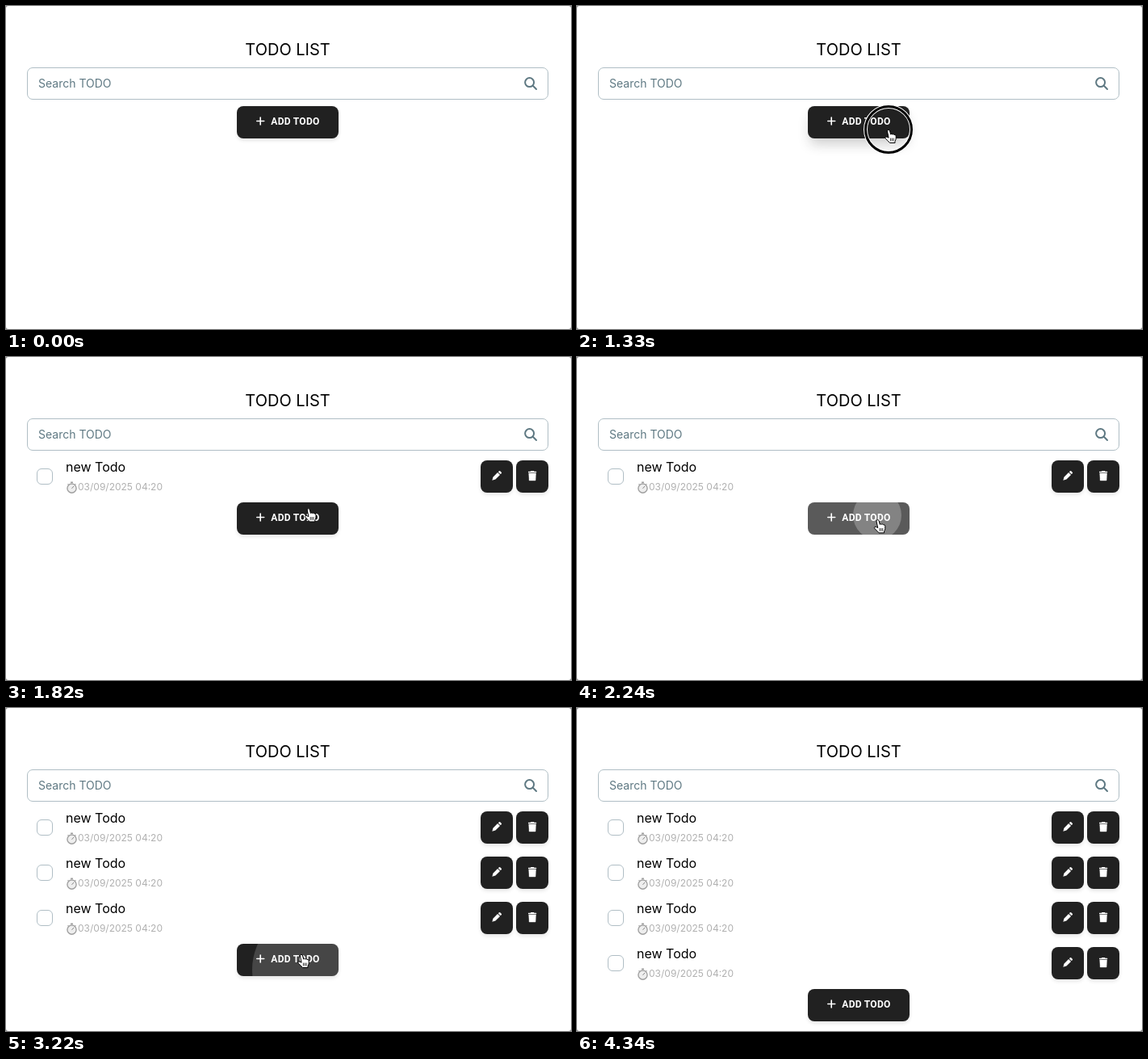
Animation, 700 px wide and 400 px high, one loop 4760 ms. Source, as an HTML page:

```html
<!DOCTYPE html>
<html lang="en">
<head>
<meta charset="utf-8">
<title>Todo list</title>
<style>
  html, body { margin: 0; width: 100%; height: 100%; overflow: hidden; background: #8a8a8a; }
  #stage { position: relative; width: 700px; height: 400px; overflow: hidden; background: #fff;
    border-radius: 3px; font-family: Inter, sans-serif; color: #000; }
  #stage div, #stage svg, #stage span { position: absolute; box-sizing: border-box; white-space: nowrap; }
  svg { overflow: visible; }
  .title { left: 0; width: 698px; top: 40px; text-align: center; font-size: 20px; line-height: 28px; }
  .search { left: 26px; top: 76px; width: 646px; height: 40px; border: 1px solid #b0bec5;
    border-radius: 7px; color: #5f7983; font-size: 14px; line-height: 38px; padding-left: 13px; }
  .dark { background: #212121; border-radius: 8px; height: 40px; box-shadow: 0 3px 5px -1px rgba(33,33,33,.14); }
  .row { left: 0; width: 700px; height: 56px; }
  .check { left: 38px; top: 22px; width: 20px; height: 20px; border: 1px solid #b0bec5; border-radius: 6px; }
  .name { left: 74px; top: 8px; font-size: 16px; line-height: 24px; }
  .date { left: 89px; top: 37px; font-size: 12px; line-height: 16px; color: #b0b0b0; }
  .tool { top: 12px; width: 40px; }
  #add { left: 286px; width: 126px; overflow: hidden; }
  #add span { left: 42.3px; top: 10px; color: #fff; font: 700 12px/18px Roboto, sans-serif; letter-spacing: .024em; }
  #ripple { border-radius: 50%; background: #fff; }
</style>
</head>
<body>
<div id="stage">
  <div class="title">TODO LIST</div>
  <div class="search">Search TODO</div>
  <svg style="left:642px;top:88px" width="16" height="16" fill="none" stroke="#5f7983" stroke-width="2" stroke-linecap="round">
    <circle cx="6.6" cy="6.6" r="5.5"/><path d="M10.8 10.8 15 15"/>
  </svg>
  <div id="rows"></div>
  <div id="add" class="dark">
    <svg style="left:24px;top:13px" width="11" height="11" stroke="#fff" stroke-width="1.6" stroke-linecap="round">
      <path d="M5.2 1V10M.8 5.5H9.7"/>
    </svg>
    <span>ADD TODO</span>
    <div id="ripple"></div>
  </div>
  <svg style="left:0;top:0" width="700" height="400">
    <g id="ring" fill="none">
      <circle r="28.5" stroke="#fff" stroke-width="5"/>
      <circle r="28.5" stroke="#000" stroke-width="3"/>
    </g>
    <g id="hand" stroke="#000" stroke-linejoin="round" stroke-linecap="round">
      <path fill="#fff" d="M-1.5 1.2Q0-.8 1.4 1L2.6 6Q3.6 4.8 4.8 6Q6 5 7 6.4Q8.8 5.8 9.2 8V11Q9 13 8 14.5V16.5H1.5Q-.5 14-3.5 11.5Q-5 9.8-3.6 9Q-2.4 8.6-.2 10Z"/>
      <path stroke-width=".8" d="M2.4 11V14M4.3 11V14M6.2 11V14"/>
    </g>
    <path id="arrow" stroke="#fff" d="M0 0V14L3.2 11 5.4 16 7.8 15 5.7 10.2H10Z"/>
  </svg>
</div>
<script>
const LOOP = 4760, STEP = 70, ROW = 56, TOP = 116;
const LEFT = 286, WIDTH = 126, HEIGHT = 40;
// ms after a click: ring gone, button pressed, row added, ripple faded
const RING = 140, PRESS = 65, ADD = 180, FADE = 420;

// each click, and the moment before it when the button lifts
const clicks = [
  { lift: 980, at: 1330 }, { lift: 1890, at: 2100 },
  { lift: 2520, at: 2968 }, { lift: 3360, at: 3705 }
];
// pointer moves: from, until, to x, to y
const moves = [
  [70, 560, 405, 148], [560, 700, 386, 153], [1470, 1960, 372, 196], [2170, 2590, 380, 268],
  [3010, 3220, 366, 305], [3220, 3500, 355, 318], [3920, 4340, 352, 410]
];

const rowHtml = `
  <div class="check"></div>
  <div class="name">new Todo</div>
  <svg style="left:74px;top:38px" width="15" height="16" fill="none" stroke="#a0a0a0">
    <circle cx="7.5" cy="8.6" r="5.6" fill="#eee" stroke-width="1.4"/>
    <path d="M6 1.2H9M2.6 3.2 3.4 4M12.4 3.2 11.6 4" stroke-width="1.4"/>
    <path d="M7.5 8.8 10 6" stroke="#888"/>
  </svg>
  <div class="date">03/09/2025 04:20</div>
  <div class="dark tool" style="left:588px">
    <svg style="left:14px;top:12.5px" width="12" height="12" fill="#fff">
      <g transform="translate(6 6) rotate(45)">
        <rect x="-2.1" y="-7" width="4.2" height="2.5" rx="1"/>
        <path d="M-2.1-3.6H2.1V4.4L0 8-2.1 4.4Z"/>
      </g>
    </svg>
  </div>
  <div class="dark tool" style="left:632px">
    <svg style="left:15px;top:12.5px" width="10" height="12" fill="#fff">
      <rect x="3" width="4.2" height="2" rx=".6"/>
      <rect y=".8" width="10.2" height="1.5" rx=".5"/>
      <path d="M.7 3H9.5L9 12H1.2Z" stroke="#fff" stroke-width=".4" stroke-linejoin="round"/>
    </svg>
  </div>`;

const $ = id => document.getElementById(id);
const show = (el, on) => el.style.display = on ? '' : 'none';
const place = (el, [x, y]) => el.setAttribute('transform', `translate(${x} ${y})`);
const ease = k => k * k * (3 - 2 * k);
const clamp = k => Math.max(0, Math.min(1, k));

const rows = clicks.map((_, i) => {
  const row = document.createElement('div');
  row.className = 'row';
  row.style.top = TOP + i * ROW + 'px';
  row.innerHTML = rowHtml;
  $('rows').append(row);
  return row;
});

function pointerAt(t) {
  let x = 362, y = 400;
  for (const [from, until, toX, toY] of moves) {
    const k = ease(clamp((t - from) / (until - from)));
    x += (toX - x) * k;
    y += (toY - y) * k;
  }
  return [x, y];
}

const buttonTop = count => TOP + 8 + count * ROW;

function drawButton(t, top) {
  const style = $('add').style;
  const lifted = clicks.find(c => t >= c.lift && t < c.at + PRESS);
  const pressed = clicks.some(c => t >= c.at + PRESS && t < c.at + ADD);
  const k = lifted ? clamp((t - lifted.lift + STEP) / (2 * STEP)) : 0;
  style.top = top + 'px';
  style.background = pressed ? '#5a5a5a' : '';
  style.boxShadow = pressed ? 'none'
    : `0 ${3 + 7 * k}px ${5 + 10 * k}px ${-1 - 2 * k}px rgba(33,33,33,${.14 + .08 * k})`;
}

function drawRipple(t) {
  const n = clicks.findIndex(c => t >= c.at + PRESS && t < c.at + PRESS + FADE);
  show($('ripple'), n >= 0);
  if (n < 0) return;
  const [x, y] = pointerAt(clicks[n].at);
  const age = t - clicks[n].at - PRESS, r = age * .4;
  Object.assign($('ripple').style, {
    left: x - LEFT - r + 'px',
    top: y - buttonTop(n) - r + 'px',
    width: 2 * r + 'px',
    height: 2 * r + 'px',
    opacity: .3 * (1 - age / FADE)
  });
}

function drawPointer(t, top) {
  const tip = pointerAt(t);
  const over = tip[0] > LEFT && tip[0] < LEFT + WIDTH && tip[1] >= top && tip[1] < top + HEIGHT;
  show($('ring'), clicks.some(c => t >= c.at && t < c.at + RING));
  show($('hand'), over);
  show($('arrow'), !over);
  ['ring', 'hand', 'arrow'].forEach(id => place($(id), tip));
}

function render(t) {
  const count = clicks.filter(c => t >= c.at + ADD).length;
  const top = buttonTop(count);
  rows.forEach((row, i) => show(row, i < count));
  drawButton(t, top);
  drawRipple(t);
  drawPointer(t, top);
}

const start = performance.now();
function tick() {
  const t = (performance.now() - start) % LOOP;
  render(Math.floor(t / STEP) * STEP);
  requestAnimationFrame(tick);
}
tick();
</script>
</body>
</html>
```
